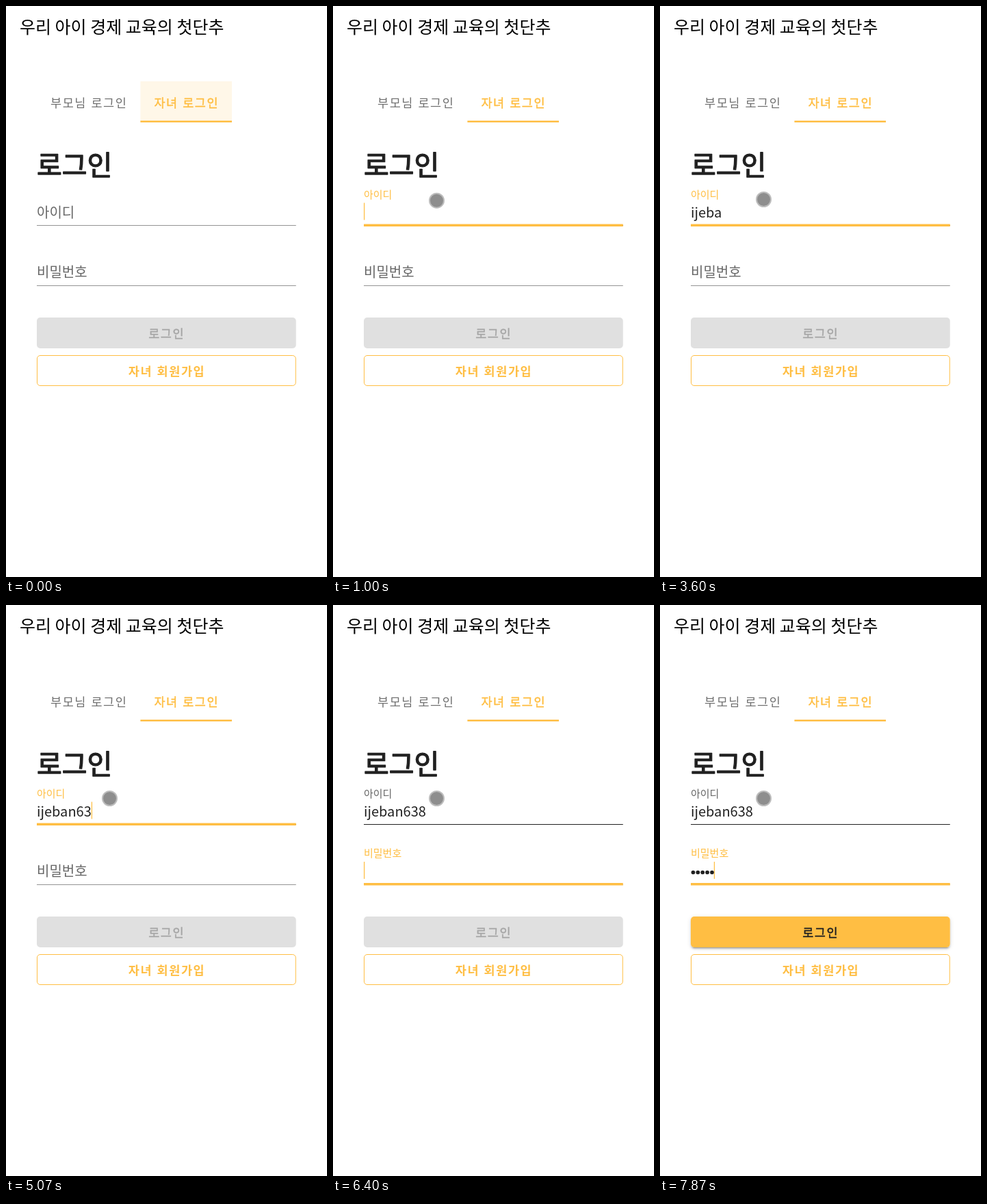
Animation, 469 px wide and 834 px high, one loop 8 s. Source, as an HTML page:

```html
<!DOCTYPE html>
<html lang="ko">
<head>
<meta charset="utf-8">
<style>
  html, body { margin: 0; width: 100%; height: 100%; overflow: hidden; background: #fff; }
  svg { position: absolute; left: 0; top: 0; display: block; }
  text { font-family: "Noto Sans CJK KR", "Noto Sans CJK", "Noto Sans KR", sans-serif; white-space: pre; }
  .title { font-size: 25px; word-spacing: -1.4px; }
  .btn { font-size: 17.5px; letter-spacing: 1.5625px; }
  .field { font-size: 20px; }
  /* a thin outline gives the medium weight */
  .medium { fill: currentColor; stroke: currentColor; stroke-width: .025em; stroke-linejoin: round; }
  .yellow { color: #ffbe43; }
  .bold { fill: #ffbe43; font-weight: 700; }
  #shadow {
    position: absolute; left: 45px; top: 455px; width: 378.75px; height: 45px; border-radius: 5px;
    box-shadow: 0 3.75px 1.25px -2.5px rgba(0,0,0,.2), 0 2.5px 2.5px rgba(0,0,0,.14), 0 1.25px 6.25px rgba(0,0,0,.12);
  }
</style>
</head>
<body>
<div id="shadow"></div>
<svg width="469" height="834" viewBox="0 0 469 834">
  <text class="title" x="20" y="40">우리 아이 경제 교육의 첫단추</text>

  <rect id="tabBg" x="196.4" y="110" width="133.6" height="60" fill="#ffbe43"/>
  <text class="btn" x="65" y="147.6" fill="#6f6f6f">부모님 로그인</text>
  <text class="btn medium yellow" x="216.4" y="147.6">자녀 로그인</text>
  <rect x="196.4" y="167.5" width="133.6" height="2.5" fill="#ffbe43"/>

  <text class="medium" x="45" y="247" font-size="40" color="#212121" style="stroke-width:1.3px">로그인</text>

  <g id="fields"></g>

  <rect id="login" x="45" y="455" width="378.75" height="45" rx="5"/>
  <text id="loginText" class="btn medium" x="208.2" y="485">로그인</text>
  <rect x="45.5" y="510.5" width="377.75" height="44" rx="4.5" fill="none" stroke="#ffbe43"/>
  <text class="btn bold" x="178.8" y="540">자녀 회원가입</text>

  <circle id="touch" cx="151.5" r="10.5" fill="#8e8e8e" stroke="#bdbdbd" stroke-width="2"/>
</svg>
<script>
const LOOP = 8000, LEFT = 45, WIDTH = 378.75;
const HOVER = 530, FOCUS_ID = 670, FOCUS_PW = 6000, BLINK = 490, LEAD = 30;
const DRIFT = 830; // the touch point slides up a little
const ID = "ijeban638";
const ID_KEYS = [1470, 1600, 1930, 2600, 3130, 3800, 4930, 5070, 5730];
const SLIP = [4330, 4730]; // a stray letter, then removed
const PW_KEYS = [6730, 6930, 7200, 7400, 7870];
const YELLOW = [255, 190, 67], GREY = [102, 102, 102], DARK = [33, 33, 33];

const $ = id => document.getElementById(id);
const clamp = v => Math.min(1, Math.max(0, v));
const lerp = (a, b, k) => a + (b - a) * k;
const mix = (a, b, k) => `rgb(${a.map((v, i) => Math.round(lerp(v, b[i], k)))})`;

function set(el, attrs) {
  for (const name in attrs) el.setAttribute(name, attrs[name]);
}

function add(parent, tag, attrs, text = "") {
  const el = document.createElementNS("http://www.w3.org/2000/svg", tag);
  set(el, attrs);
  el.textContent = text;
  return parent.appendChild(el);
}

function bezier(x1, y1, x2, y2) {
  const at = (a, b, s) => 3 * (1 - s) ** 2 * s * a + 3 * (1 - s) * s * s * b + s ** 3;
  return x => {
    if (x <= 0 || x >= 1) return clamp(x);
    let lo = 0, hi = 1;
    for (let i = 0; i < 24; i++) {
      const mid = (lo + hi) / 2;
      if (at(x1, x2, mid) < x) lo = mid; else hi = mid;
    }
    return at(y1, y2, lo);
  };
}
const swing = bezier(.25, .8, .5, 1);
const standard = bezier(.4, 0, .2, 1);

function makeField(label, top) {
  const g = $("fields");
  return {
    top,
    base: add(g, "rect", { x: LEFT, y: Math.round(top + 32.5), width: WIDTH, height: 1 }),
    line: add(g, "rect", { y: top + 31, height: 3.5 }),
    label: add(g, "text", { class: "field", y: 21 }, label),
    value: add(g, "text", { class: "field", x: LEFT, y: top + 21, fill: "#212121" }),
    caret: add(g, "rect", { y: top, width: 1.25, height: 25, fill: "#ffbe43" })
  };
}

const idField = makeField("아이디", 287.5);
const pwField = makeField("비밀번호", 375);
const dots = PW_KEYS.map((_, i) =>
  add($("fields"), "circle", { cx: LEFT + 3.45 + i * 6.88, cy: 390.5, r: 2.85, fill: "#212121" }));

// lift: label raised, tint: label colour, grow: underline share, glow: underline colour
function drawField(f, { lift, tint, grow, glow, base }) {
  const w = WIDTH * grow;
  set(f.label, {
    transform: `translate(${LEFT} ${f.top - 22.5 * lift}) scale(${1 - .25 * lift})`,
    fill: mix(GREY, YELLOW, tint)
  });
  set(f.line, { x: LEFT + (WIDTH - w) / 2, width: w, fill: mix(DARK, YELLOW, glow) });
  set(f.base, { fill: `rgba(0,0,0,${base})` });
}

function drawCaret(f, offset, focused, since) {
  const on = focused && since % (2 * BLINK) < BLINK;
  set(f.caret, { x: LEFT + offset, opacity: on ? 1 : 0 });
}

const pressed = (keys, t) => keys.filter(k => t >= k - LEAD);
const lastOf = (start, keys, t) => Math.max(start, ...pressed(keys, t).map(k => k - LEAD));

function draw(t) {
  const raw1 = clamp((t - FOCUS_ID) / 300), raw2 = clamp((t - FOCUS_PW) / 300);
  const in1 = swing(raw1), in2 = swing(raw2);
  const hover = swing(clamp((t - HOVER) / 300));

  set($("tabBg"), { opacity: .12 * (1 - in1) });
  drawField(idField, {
    lift: in1, tint: in1 - in2, grow: in1 - in2, glow: raw1 - raw2, base: lerp(.42, .87, hover)
  });
  drawField(pwField, { lift: in2, tint: in2, grow: in2, glow: raw2, base: .42 });

  const slipped = pressed(SLIP, t).length === 1;
  const typed = ID.slice(0, pressed(ID_KEYS, t).length) + (slipped ? "i" : "");
  if (idField.value.textContent !== typed) idField.value.textContent = typed;
  const idWidth = typed ? idField.value.getComputedTextLength() : 0;
  drawCaret(idField, idWidth, t >= FOCUS_ID && t < FOCUS_PW,
    t - lastOf(FOCUS_ID, [...ID_KEYS, ...SLIP], t));

  const count = pressed(PW_KEYS, t).length;
  dots.forEach((d, i) => set(d, { opacity: i < count ? 1 : 0 }));
  drawCaret(pwField, count * 6.88 - (count ? .6 : 0), t >= FOCUS_PW, t - lastOf(FOCUS_PW, PW_KEYS, t));

  set($("login"), { fill: count ? "#ffbe43" : "#e0e0e0" });
  set($("loginText"), { color: count ? "#212121" : "#a6a6a6" });
  $("shadow").style.opacity = standard(clamp((t - PW_KEYS[0]) / 280));
  set($("touch"), {
    cy: lerp(288.5, 282.5, clamp((t - DRIFT) / 240)),
    opacity: t >= HOVER ? 1 : 0
  });
}

const start = performance.now();
function tick() {
  draw((performance.now() - start) % LOOP);
  requestAnimationFrame(tick);
}
tick();
</script>
</body>
</html>
```
